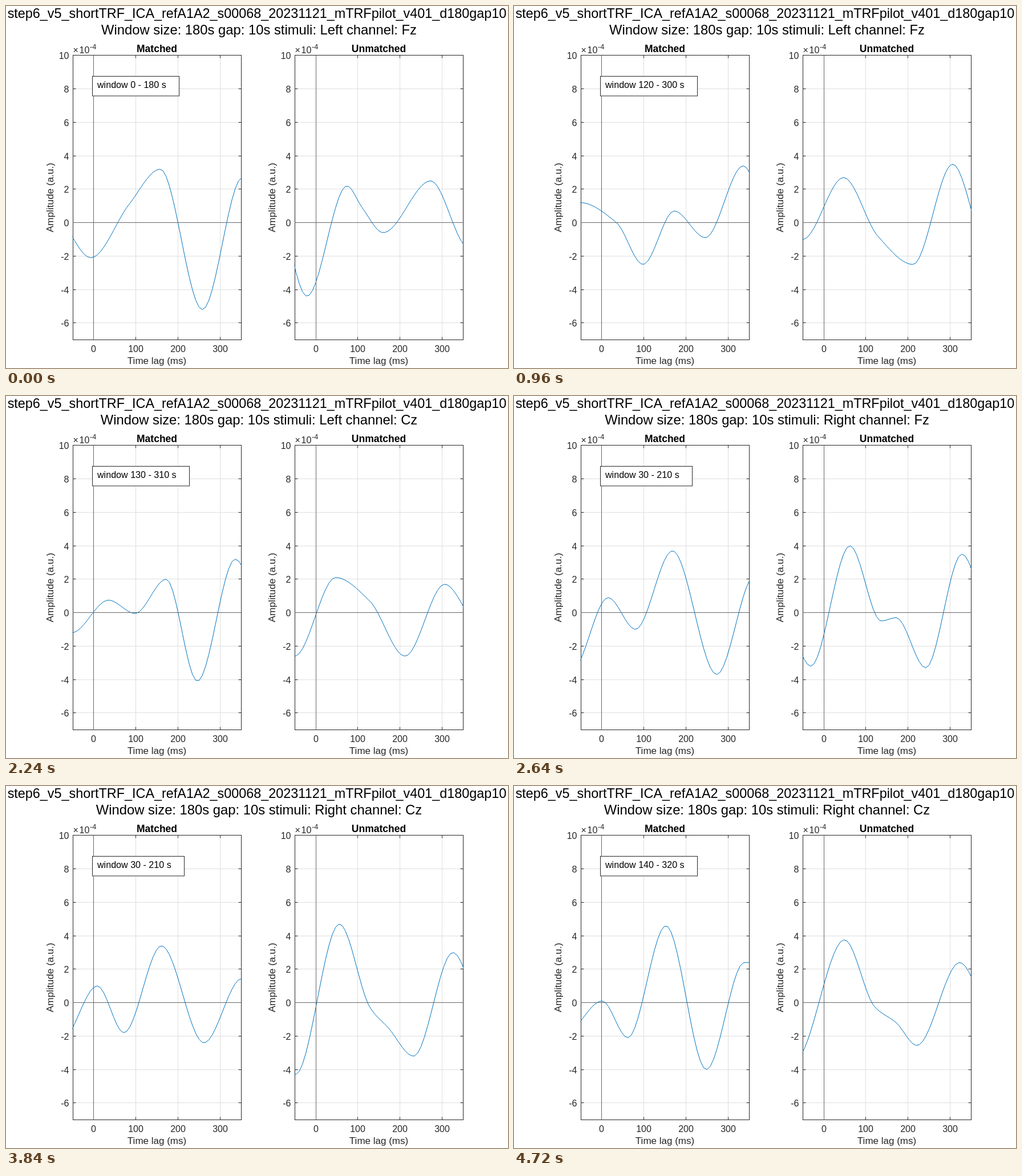
Recreate the animation shown at these times as an HTML page with a canvas. Size 880 px wide and 636 px high, loop 4.8 s.

```html
<!DOCTYPE html>
<html lang="en">
<head>
<meta charset="utf-8">
<title>Sliding window response</title>
<style>
html, body { margin: 0; width: 100%; height: 100%; overflow: hidden; background: #fff; }
canvas { display: block; }
</style>
</head>
<body>
<canvas id="stage" width="880" height="636"></canvas>
<script>
const ctx = document.getElementById('stage').getContext('2d');

const STEP_MS = 80, STEPS = 15;
const INK = '#262626', GRID = '#dfdfdf', ZERO = '#676767', BLUE = '#0072bd';
const LAG_MIN = -50, LAG_MAX = 350, AMP_MIN = -7, AMP_MAX = 10;
const TOP = 86.8, WIDTH = 295.2, HEIGHT = 499.5;
const PANELS = [{ name: 'Matched', left: 117 }, { name: 'Unmatched', left: 506.2 }];

const clamp = (v, lo, hi) => Math.min(hi, Math.max(lo, v));
const mix = (a, b, k) => a + (b - a) * k;
const mixLists = (a, b, k) => a.map((v, i) => mix(v, b[i], k));
const scale = (list, gain) => list.map(v => v * gain);
const snap = v => Math.floor(v) + .5;
const xAt = (panel, lag) => panel.left + (lag - LAG_MIN) / (LAG_MAX - LAG_MIN) * WIDTH;
const yAt = amp => TOP + (AMP_MAX - amp) / (AMP_MAX - AMP_MIN) * HEIGHT;

// Lags of each wave's turning points: early and late position, per panel.
const LAGS = {
  Left: [
    [[-97, -7, 84, 158, 258, 353], [-52, 35, 98, 172, 246, 336]],
    [[-21, 74, 110, 160, 273], [-50, 47, 128, 212, 306]]],
  Right: [
    [[-72, 15, 80, 168, 273], [-85, 4, 66, 156, 254]],
    [[-31, 62, 136, 172, 242, 328], [-60, 52, 124, 172, 226, 324]]]
};

const LEFT_CZ = [[-1.2, .75, -.05, 2, -4.1, 3.2], [-2.6, 2.1, .7, -2.6, 1.7]];
const RIGHT_CZ = [-4.3, 4.7, -.3, -1.5, -3.2, 3];

// Over the given steps the turning points glide along phase while their heights change.
const CONDITIONS = [
  { side: 'Left', channel: 'Fz', steps: [0, 12], phase: [0, 1], amps: [
    [[.5, -2.1, 1.1, 3.2, -5.2, 2.7], [1.2, 0, -2.5, .7, -.9, 3.4]],
    [[-4.4, 2.2, .9, -.6, 2.5], [-1, 2.7, -.8, -2.5, 3.5]]] },
  { side: 'Left', channel: 'Cz', steps: [0, 7], phase: [1, 1],
    amps: LEFT_CZ.map(list => [scale(list, 1.4), list]) },
  { side: 'Right', channel: 'Fz', steps: [3, 10], phase: [0, 1], amps: [
    [[-3.5, .9, -1, 3.7, -3.7], [-3.8, -.4, -.8, 3.1, -2.7]],
    [[-3.2, 4, -.5, -.3, -3.3, 3.5], [-4, 4.7, 0, -1.6, -3.6, 3.7]]] },
  { side: 'Right', channel: 'Cz', steps: [3, 14], phase: [.6, 1.3], amps: [
    [[-2.4, 1, -1.8, 3.4, -2.4], [-1.9, .1, -2.1, 4.6, -4]],
    [RIGHT_CZ, scale(RIGHT_CZ, .8)]] }
];

// Monotone cubic through the turning points, swinging back past both ends.
function wave(lags, amps) {
  const swing = 90, rebound = -.6;
  const xs = [lags[0] - swing, ...lags, lags.at(-1) + swing];
  const ys = [amps[0] * rebound, ...amps, amps.at(-1) * rebound];
  const secant = i => (ys[i + 1] - ys[i]) / (xs[i + 1] - xs[i]);
  const slopes = xs.map((_, i) => {
    if (i === 0 || i === xs.length - 1) return 0;
    const a = secant(i - 1), b = secant(i);
    return a * b > 0 ? 2 * a * b / (a + b) : 0;
  });
  return lag => {
    let i = 0;
    while (i < xs.length - 2 && lag > xs[i + 1]) i++;
    const h = xs[i + 1] - xs[i], t = clamp((lag - xs[i]) / h, 0, 1), s = 1 - t;
    return mix(ys[i], ys[i + 1], t * t * (3 - 2 * t))
      + h * t * s * (s * slopes[i] - t * slopes[i + 1]);
  };
}

function waveAt({ side, steps, phase, amps }, step, side2) {
  const k = clamp((step - steps[0]) / (steps[1] - steps[0]), 0, 1);
  const lags = mixLists(...LAGS[side][side2], mix(...phase, k));
  return wave(lags, mixLists(...amps[side2], k));
}

function text(str, x, y, size, { align = 'left', color = INK, weight = 'normal' } = {}) {
  ctx.font = `${weight} ${size}px "Liberation Sans", Arial, sans-serif`;
  ctx.textAlign = align;
  ctx.fillStyle = color;
  ctx.fillText(str, x, y);
}

function line(x1, y1, x2, y2, color) {
  ctx.strokeStyle = color;
  ctx.beginPath();
  ctx.moveTo(x1, y1);
  ctx.lineTo(x2, y2);
  ctx.stroke();
}

function drawAxes(panel) {
  const l = snap(panel.left), r = snap(panel.left + WIDTH);
  const t = snap(TOP), b = snap(TOP + HEIGHT), mid = (l + r) / 2 - .5;
  const lags = [0, 100, 200, 300], amps = [-6, -4, -2, 0, 2, 4, 6, 8, 10];
  const cols = lags.map(lag => snap(xAt(panel, lag)));
  const rows = amps.map(amp => snap(yAt(amp)));

  cols.forEach(x => line(x, t, x, b, GRID));
  rows.forEach(y => line(l, y, r, y, GRID));
  cols.forEach((x, i) => {
    line(x, b, x, b - 5, INK);
    line(x, t, x, t + 5, INK);
    text(lags[i], x, 607.5, 16, { align: 'center' });
  });
  rows.forEach((y, i) => {
    line(l, y, l + 5, y, INK);
    line(r, y, r - 5, y, INK);
    text(amps[i], l - 7, y + 6, 16, { align: 'right' });
  });
  ctx.strokeStyle = INK;
  ctx.strokeRect(l, t, r - l, b - t);

  text('×', l, 83, 16);
  text('10', l + 11, 83, 16);
  text('-4', l + 29.5, 76, 12.8);
  text(panel.name, mid, 81, 17.5, { align: 'center', color: '#000', weight: 'bold' });
  text('Time lag (ms)', mid, 629, 17, { align: 'center' });
  ctx.save();
  ctx.translate(l - 34.5, 336.5);
  ctx.rotate(-Math.PI / 2);
  text('Amplitude (a.u.)', 0, 0, 17.3, { align: 'center' });
  ctx.restore();
}

function drawCurve(panel, ampAt) {
  const samplePeriod = 1000 / 128;
  ctx.save();
  ctx.beginPath();
  ctx.rect(panel.left - .5, TOP, WIDTH + 1, HEIGHT);
  ctx.clip();
  ctx.strokeStyle = BLUE;
  ctx.lineJoin = 'round';
  ctx.beginPath();
  for (let k = -7; k <= 45; k++) {
    const lag = k * samplePeriod;
    ctx.lineTo(xAt(panel, lag), yAt(ampAt(lag)));
  }
  ctx.stroke();
  ctx.restore();

  const x0 = snap(xAt(panel, 0)), y0 = snap(yAt(0));
  line(x0, TOP, x0, TOP + HEIGHT, ZERO);
  line(panel.left, y0, panel.left + WIDTH, y0, ZERO);
}

function drawWindowLabel(start) {
  const width = 152 + 9 * (String(start).length - 1);
  ctx.fillStyle = '#fff';
  ctx.strokeStyle = INK;
  ctx.fillRect(151.5, 123.5, width, 35);
  ctx.strokeRect(151.5, 123.5, width, 34.5);
  text(`window ${start} - ${start + 180} s`, 160, 143.5, 16.1, { color: '#000' });
}

function draw(now) {
  const tick = Math.floor(now / STEP_MS) % (STEPS * CONDITIONS.length);
  const condition = CONDITIONS[Math.floor(tick / STEPS)], step = tick % STEPS;
  const heading = { align: 'center', color: '#000' };

  ctx.fillStyle = '#fff';
  ctx.fillRect(0, 0, 880, 636);
  ctx.lineWidth = 1;
  text('step6_v5_shortTRF_ICA_refA1A2_s00068_20231121_mTRFpilot_v401_d180gap10', 440, 21, 23.4, heading);
  text(`Window size: 180s gap: 10s stimuli: ${condition.side} channel: ${condition.channel}`,
    443.5, 50, 23.8, heading);
  PANELS.forEach((panel, i) => {
    drawAxes(panel);
    drawCurve(panel, waveAt(condition, step, i));
  });
  drawWindowLabel(step * 10);
}

function loop(now) {
  draw(now);
  requestAnimationFrame(loop);
}
draw(0);
requestAnimationFrame(loop);
</script>
</body>
</html>
```
